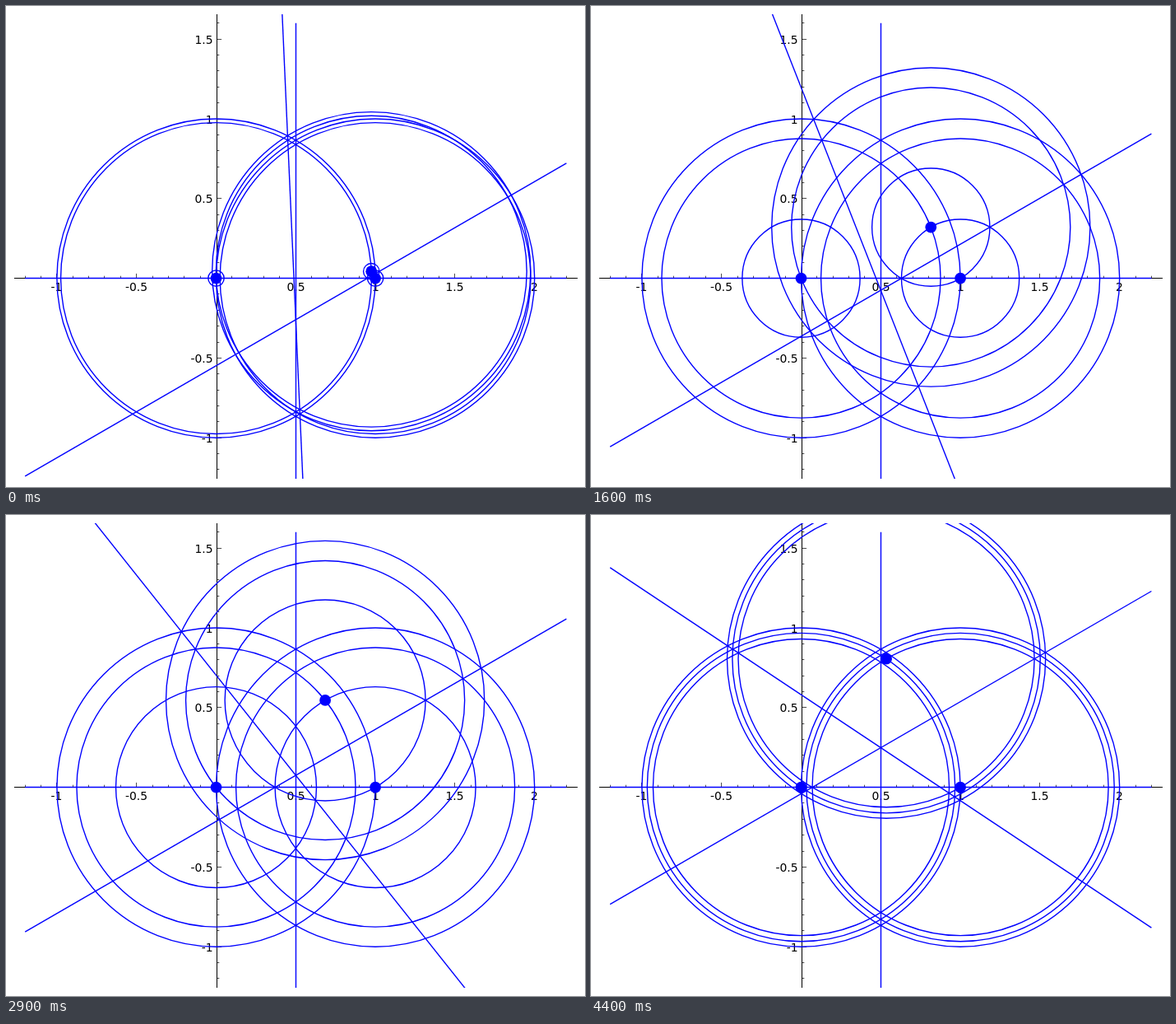
Write an HTML page with a canvas that moves like this. It is 704 px wide and 584 px high and loops after 4500 ms.

```html
<!DOCTYPE html>
<html lang="en">
<head>
<meta charset="utf-8">
<title>Triangle circles and bisectors</title>
<style>
html, body { margin: 0; width: 100%; height: 100%; overflow: hidden; background: #fff; }
canvas { display: block; }
</style>
</head>
<body>
<canvas id="stage" width="704" height="584"></canvas>
<script>
const ctx = document.getElementById('stage').getContext('2d');
const UNIT = 193.6, STEP = 100, STEPS = 45;
const BOX = { left: 10, top: 10, right: 695, bottom: 574 };
const AXIS_X = 256.5, AXIS_Y = 330.5;
const X_MIN = -1.2, X_MAX = 2.2;

const px = x => 255.5 + x * UNIT;
const py = y => 330.6 - y * UNIT;
const snap = v => Math.floor(v) + 0.5;

function segment(x1, y1, x2, y2) {
  ctx.beginPath();
  ctx.moveTo(x1, y1);
  ctx.lineTo(x2, y2);
  ctx.stroke();
}

function disc(p, radius) {
  ctx.beginPath();
  ctx.arc(px(p.x), py(p.y), radius, 0, 2 * Math.PI);
}

function drawAxes() {
  ctx.strokeStyle = ctx.fillStyle = '#000';
  ctx.lineWidth = 1;
  ctx.font = '13.9px "DejaVu Sans", sans-serif';
  segment(BOX.left, AXIS_Y, BOX.right, AXIS_Y);
  segment(AXIS_X, BOX.top, AXIS_X, BOX.bottom);

  // Ticks every tenth; every fifth one is long and labelled.
  for (let i = -12; i <= 22; i++) {
    if (i === 0) continue;
    const major = i % 5 === 0, size = major ? 5.6 : 2.8;
    const x = snap(px(i / 10)), y = snap(py(i / 10));
    ctx.lineWidth = 0.7;
    segment(x, AXIS_Y, x, AXIS_Y - size);
    if (i <= 16) segment(AXIS_X, y, AXIS_X + size, y);
    if (!major) continue;
    ctx.textAlign = 'center';
    ctx.fillText(i / 10, x, 346);
    ctx.textAlign = 'right';
    if (i <= 16) ctx.fillText(i / 10, 251.5, y + 5);
  }
}

// Line through p with the given slope, across the plotted x range.
function slopedLine(p, slope) {
  const at = x => py(p.y + slope * (x - p.x));
  segment(px(X_MIN), at(X_MIN), px(X_MAX), at(X_MAX));
}

function drawFigure(side) {
  const a = { x: 0, y: 0 }, b = { x: 1, y: 0 };
  const c = { x: 1 - side / 2, y: side * Math.sqrt(3) / 2 };
  const points = [a, b, c];
  const lengths = [1, side, Math.hypot(c.x, c.y)];

  ctx.strokeStyle = ctx.fillStyle = '#00f';
  ctx.lineWidth = 1.39;
  for (const p of points) {
    for (const r of lengths) {
      disc(p, r * UNIT);
      ctx.stroke();
    }
  }

  // Base line and the perpendicular bisectors of the three sides.
  segment(px(X_MIN), AXIS_Y, px(X_MAX), AXIS_Y);
  segment(snap(px(0.5)), py(1.6), snap(px(0.5)), BOX.bottom);
  slopedLine({ x: (1 + c.x) / 2, y: c.y / 2 }, 1 / Math.sqrt(3));
  slopedLine({ x: c.x / 2, y: c.y / 2 }, -c.x / c.y);

  for (const p of points) {
    disc(p, 6.9);
    ctx.fill();
  }
}

const start = performance.now();
function frame() {
  const elapsed = Math.max(0, performance.now() - start);
  const step = Math.floor(elapsed / STEP) % STEPS;
  ctx.fillStyle = '#fff';
  ctx.fillRect(0, 0, 704, 584);
  drawAxes();
  ctx.save();
  ctx.beginPath();
  ctx.rect(BOX.left, BOX.top, BOX.right - BOX.left, BOX.bottom - BOX.top);
  ctx.clip();
  drawFigure(0.05 + 0.02 * step);
  ctx.restore();
  requestAnimationFrame(frame);
}
frame();
</script>
</body>
</html>
```
